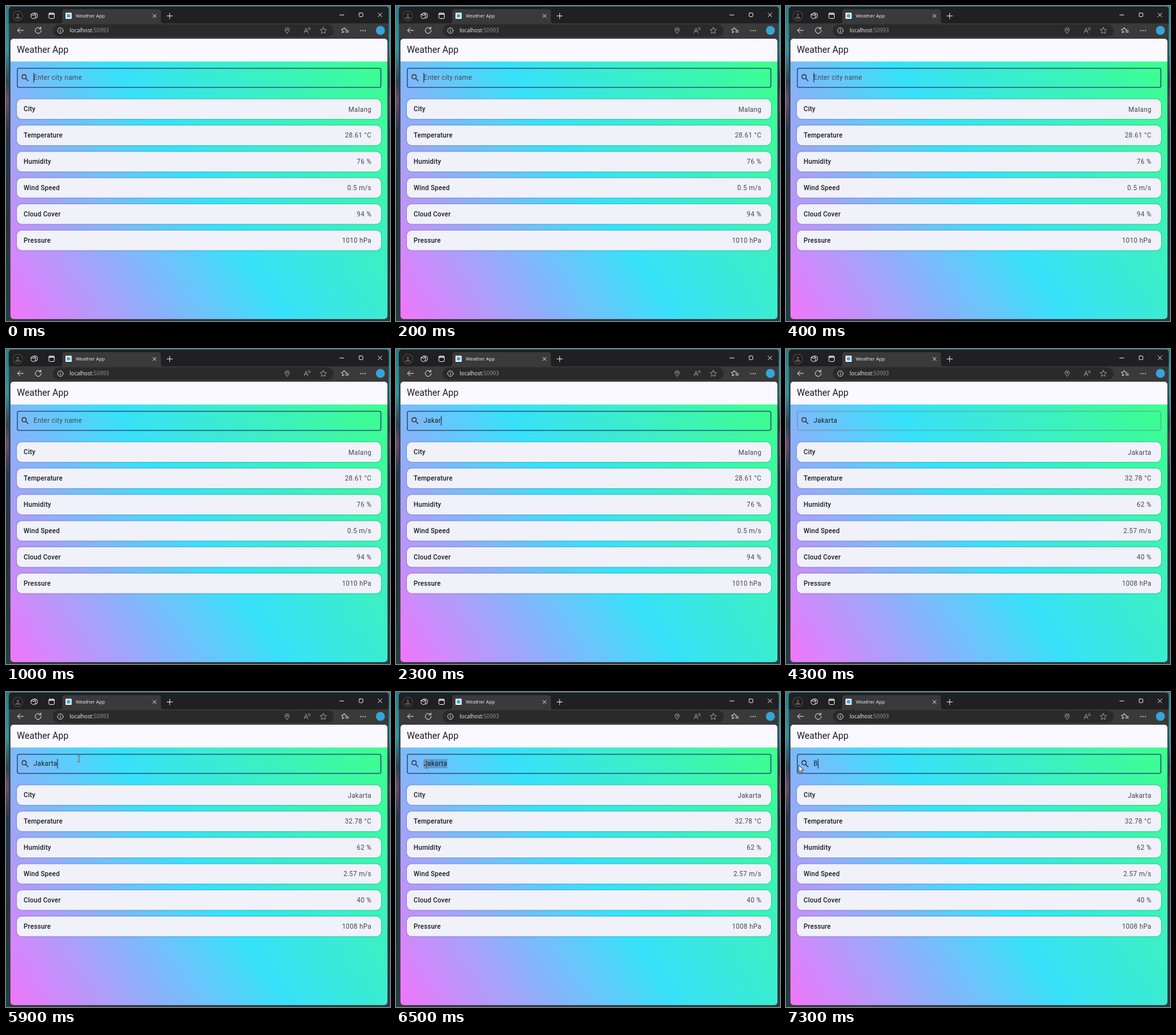
Animation, 600 px wide and 491 px high, one loop 8 s. Source, as an HTML page:

```html
<!DOCTYPE html>
<html lang="en">
<head>
<meta charset="utf-8">
<title>Weather App</title>
<style>
  html, body { margin: 0; width: 100%; height: 100%; overflow: hidden; background: #1c2a33; }
  svg { display: block; width: 600px; height: 491px; }
  text { font: 400 10.3px Roboto, sans-serif; letter-spacing: .32px; white-space: pre; }
  .chrome { font: 400 8.4px "Open Sans", sans-serif; letter-spacing: 0; }
  .tab { font-size: 7.5px; }
  .title { font-size: 14.1px; letter-spacing: 0; }
  .label { font-weight: 500; letter-spacing: .18px; }
  .icon { fill: none; stroke: #e4e4e4; stroke-width: 1; stroke-linecap: round; stroke-linejoin: round; }
  .dim { stroke: #a2a2a2; }
  .card { fill: #f1f1f9; filter: drop-shadow(0 .7px .8px rgba(0, 0, 0, .38)); }
</style>
</head>
<body>
<svg viewBox="0 0 600 491">
  <defs>
    <linearGradient id="sky" gradientUnits="userSpaceOnUse" x1="7" y1="488" x2="596" y2="87">
      <stop offset="0" stop-color="#f276fb"/>
      <stop offset=".5" stop-color="#38e1fa"/>
      <stop offset="1" stop-color="#3dff8c"/>
    </linearGradient>
    <linearGradient id="wall" x2="0" y2="1">
      <stop offset="0" stop-color="#22808a"/>
      <stop offset=".14" stop-color="#2a9aa6"/>
      <stop offset=".24" stop-color="#23465c"/>
      <stop offset=".3" stop-color="#6b4a78"/>
      <stop offset=".4" stop-color="#1d3a52"/>
      <stop offset=".7" stop-color="#22323f"/>
      <stop offset="1" stop-color="#1c4048"/>
    </linearGradient>
    <clipPath id="page"><rect x="7" y="51" width="589" height="437" rx="5"/></clipPath>
  </defs>

  <rect width="600" height="491" fill="url(#wall)"/>
  <rect x="4.5" y="1" width="593.5" height="489" rx="5" fill="#3a3a3b"/>
  <path d="M4.5 27V6q0-5 5-5H593q5 0 5 5V27Z" fill="#201f21"/>
  <path d="M84 27q4 0 4-4V9q0-4 4-4H238q4 0 4 4V23q0 4 4 4Z" fill="#3a3a3b"/>
  <rect x="73" y="28.5" width="439" height="19.5" rx="9.7" fill="#2a2a2b"/>

  <circle cx="18.5" cy="15.5" r="8" fill="#4b4644"/>
  <circle cx="18.5" cy="15.5" r="6.8" fill="#1d1a1b"/>
  <path d="M14.5 20q0-4 4-4t4 4Z" fill="#5c504e"/>
  <circle cx="18.5" cy="13.6" r="2" fill="#5c504e"/>
  <rect x="93" y="10.5" width="9.5" height="9.5" fill="#fff"/>
  <circle cx="97.7" cy="15.2" r="3" fill="#3fa9e6"/>
  <circle cx="585" cy="38" r="7" fill="#38a5d8"/>

  <g class="icon">
    <path d="M42 12l3-1.5 4 1.8v5l-3 2M39.5 13l3-1.8 3.6 1.8v5l-3.6 2-3-2Zm0 0 3.3 1.8 3.3-1.8"/>
    <rect x="67" y="11" width="8.5" height="8.5" rx="1.5"/>
    <path d="M67.5 12.5h7.5" stroke-width="2"/>
    <path d="M229.5 13l5 5m0-5-5 5M251.5 15.5h8.5m-4.25-4.25v8.5M521.5 14h6.5M581.3 10.8l6 6m0-6-6 6"/>
    <rect x="551.8" y="10.8" width="5.8" height="5.8" rx="1"/>
    <path d="M27 38h-9m4-4-4 4 4 4M54 35.2a4.6 4.6 0 1 0 1 2.8M54.5 32.8v2.8h-2.8"/>
    <circle cx="85" cy="38.3" r="4.3" stroke-width=".9"/>
    <path d="M85 37.8v2.5m0-4.3v.1"/>
    <path d="M525.6 41.6l.5-3-2-2 2.9-.5 1.4-2.7 1.4 2.7 2.5.4M531 38.5h4m-4 2.2h4M525.6 41.6l2.8-1.6"/>
    <path d="M554.4 38.3h.1m3.4 0h.1m3.4 0h.1" stroke-width="1.7"/>
    <g class="dim">
      <path d="M439.3 42.5q-3.3-3-3.3-5.2a3.3 3.3 0 0 1 6.6 0q0 2.2-3.3 5.2Z"/>
      <circle cx="439.3" cy="37.2" r=".8"/>
      <path d="M465.8 42l3-7.5 3 7.5m-5-2.6h4M472 34.2q1.3 1.2 1.2 3M473.8 33q1.7 1.7 1.6 4.2" stroke-width=".9"/>
      <path id="star" stroke-width=".9"/>
    </g>
  </g>
  <text class="chrome tab" x="109" y="18" fill="#f0f0f0">Weather App</text>
  <text class="chrome" x="99.5" y="41.3" fill="#f2f2f2">localhost<tspan fill="#9b9b9b">:50993</tspan></text>

  <g clip-path="url(#page)">
    <rect x="7" y="51" width="589" height="437" fill="url(#sky)"/>
    <rect x="7" y="51" width="589" height="35.5" fill="#f9f9ff"/>
  </g>
  <text class="title" x="17" y="73" fill="#1a1b20">Weather App</text>

  <rect id="border" x="17.7" y="97.2" width="568" height="29.6" rx="2.4" fill="none"/>
  <g fill="none" stroke="#353a48" stroke-width="1.4">
    <circle cx="28.3" cy="110.3" r="3.3"/>
    <path d="M30.7 112.7l4.2 4.2"/>
  </g>
  <rect id="selection" x="43" y="104.5" height="14.5" fill="#415f91" fill-opacity=".4"/>
  <text id="hint" x="43" y="115.3" fill="#44474e">Enter city name</text>
  <text id="query" x="43" y="115.3" fill="#1a1c20"></text>
  <rect id="caret" y="104.3" width="1.3" height="15" fill="#24466f"/>

  <g id="cards"></g>

  <path id="arrow" d="M0 0v10.6l2.4-2.2 1.7 3.8 1.7-.8-1.6-3.6h3.4Z" fill="#fff" stroke="#1a1a1a" stroke-width=".8"/>
  <path id="beam" d="M-2.5-5h2L0-4.5.5-5h2M0-4.5v9M-2.5 5h2L0 4.5.5 5h2" fill="none" stroke="#9c552e"/>
</svg>

<script>
const LOOP = 8000;
const $ = id => document.getElementById(id);

const labels = ["City", "Temperature", "Humidity", "Wind Speed", "Cloud Cover", "Pressure"];
const malang = ["Malang", "28.61 °C", "76 %", "0.5 m/s", "94 %", "1010 hPa"];
const jakarta = ["Jakarta", "32.78 °C", "62 %", "2.57 m/s", "40 %", "1008 hPa"];

// Step tables: [start ms, value]
const steps = {
  query: [[0, ""], [1600, "J"], [1900, "Ja"], [2000, "Jak"], [2100, "Jakar"],
          [2800, "Jakart"], [2900, "Jakarta"], [7000, ""], [7200, "B"]],
  hint: [[0, 1], [1600, .4], [1700, 0], [7000, 1], [7200, .4], [7300, 0]],
  caret: [[0, 1], [700, 0], [1200, 1], [3500, 0], [5800, 1], [6300, 0], [7000, 1]],
  focus: [[0, 1], [3500, .5], [3600, 0], [5800, .5], [5900, 1]],
  selected: [[0, 0], [6300, 1], [7000, 0]],
  weather: [[0, malang], [3700, jakarta]],
  mouse: [[0, null], [5600, [150, 172]], [5700, [124, 122]], [5800, [114, 104]],
          [6000, [106, 107]], [6100, [95, 110]], [6200, [86, 113]],
          [6500, [48, 114]], [6600, [20, 114]]]
};
const at = (name, t) => steps[name].findLast(([start]) => start <= t)[1];

$("cards").innerHTML = labels.map((label, i) => {
  const y = 145.3 + i * 40.95;
  return `<rect class="card" x="17" y="${y}" width="569" height="30.7" rx="7.7"/>
    <text class="label" x="27.5" y="${y + 18.6}" fill="#1a1b20">${label}</text>
    <text class="value" x="571" y="${y + 19.2}" text-anchor="end" fill="#44474e"></text>`;
}).join("");
const values = document.querySelectorAll(".value");

const starPoints = Array.from({ length: 10 }, (_, i) => {
  const r = i % 2 ? 2.5 : 5.2, a = i * Math.PI / 5;
  return `${495.8 + r * Math.sin(a)} ${38.5 - r * Math.cos(a)}`;
});
$("star").setAttribute("d", `M${starPoints.join("L")}Z`);

const show = (el, visible) => el.setAttribute("visibility", visible ? "visible" : "hidden");

function draw(t) {
  const query = $("query");
  query.textContent = at("query", t);
  const width = query.textContent ? query.getComputedTextLength() : 0;

  $("hint").setAttribute("opacity", at("hint", t));
  $("caret").setAttribute("x", 42.8 + width);
  show($("caret"), at("caret", t));
  $("selection").setAttribute("width", width);
  show($("selection"), at("selected", t));

  const focus = at("focus", t);
  $("border").setAttribute("stroke", focus ? "#24466f" : "#74777f");
  $("border").setAttribute("stroke-width", .7 + .6 * focus);

  const weather = at("weather", t);
  values.forEach((el, i) => el.textContent = weather[i]);

  const mouse = at("mouse", t);
  const overText = mouse && mouse[0] > 41 && mouse[1] < 127;
  show($("arrow"), mouse && !overText);
  show($("beam"), overText);
  if (mouse) $(overText ? "beam" : "arrow").setAttribute("transform", `translate(${mouse})`);
}

const start = performance.now();
function tick() {
  draw((performance.now() - start) % LOOP);
  requestAnimationFrame(tick);
}
tick();
</script>
</body>
</html>
```
